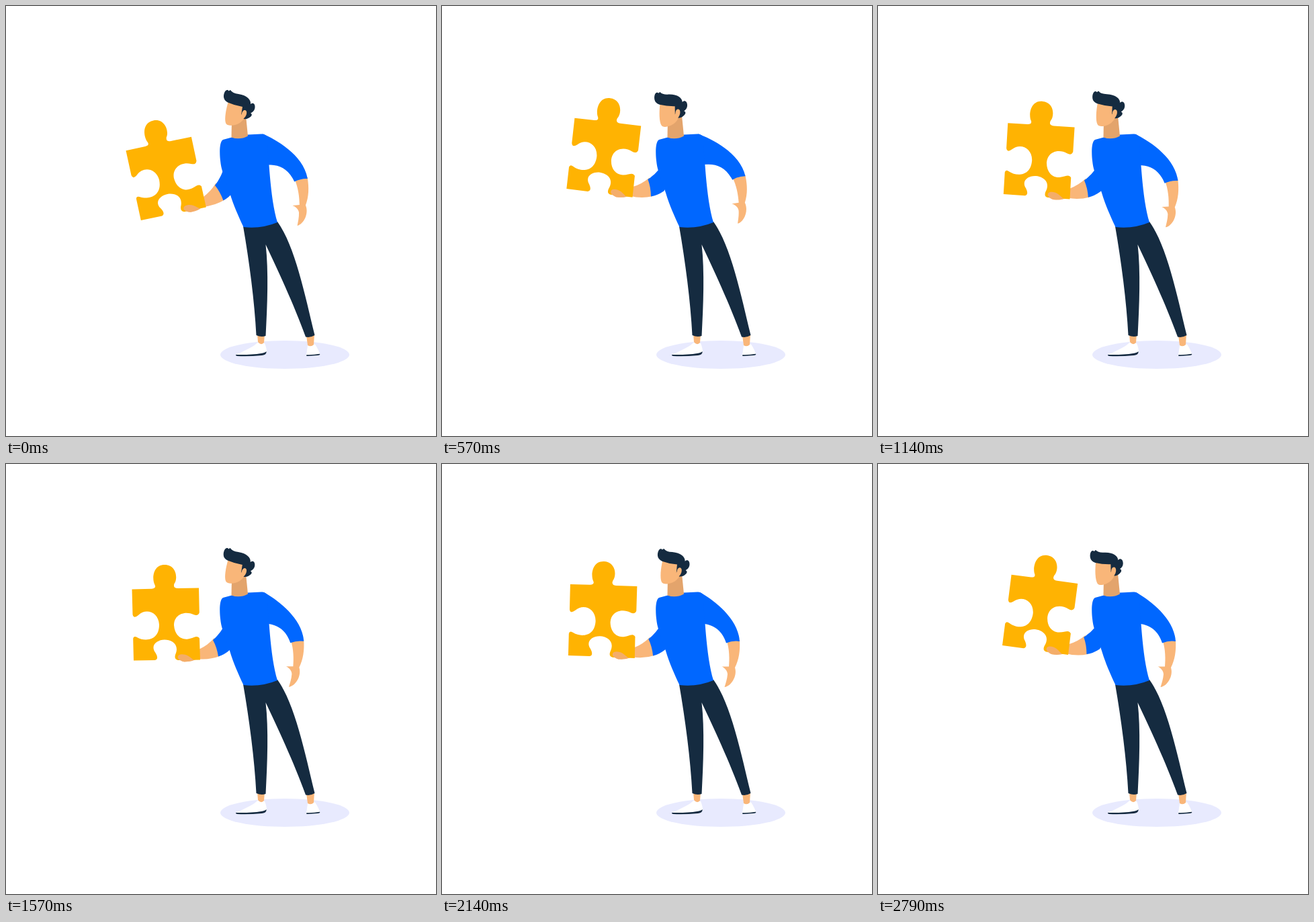
Write an HTML page that moves like this. It is 640 px wide and 640 px high and loops after 3710 ms.

```html
<!DOCTYPE html>
<html lang="en">
<head>
<meta charset="utf-8">
<style>
  html, body { margin: 0; width: 100%; height: 100%; overflow: hidden; background: #fff; }
  svg { display: block; width: 100%; height: 100%; }
  .skin { fill: #f9b679; }
  .navy { fill: #152b40; }
  .blue { fill: #0067ff; }
</style>
</head>
<body>
<svg viewBox="0 0 640 640">
  <ellipse cx="415" cy="519" rx="96" ry="21" fill="#e8eafe"/>

  <!-- feet and trousers -->
  <path fill="#fff" d="M342 519.5L362 509.5Q371 505 374 501L385 502Q388 509 388 515Q370 520 342 519.5ZM447 519.5L449 505L460 503.5Q465 511 467.5 518.5Z"/>
  <path class="skin" d="M374 488L375 500Q379 506 384 501L385 488ZM447 490L449 505Q454 508 458 504L459 488Z"/>
  <path class="navy" d="M342 519Q365 519.5 380 517Q386 516 387.5 514Q388.5 519 381 520Q360 522 344 521Q341.5 520.5 342 519ZM447.5 519.2Q458 519.5 467 517.8Q469 520 460 520.3L449 521Q446 521 447.5 519.2Z"/>
  <path class="navy" d="M353 328C362 380 370 440 372.5 490Q380 493.500 386.5 491C389 445 391 395 386.5 355C403 390 429 445 446 492.5Q453 494 459.5 490C445 430 430 357 404 321Z"/>

  <!-- free arm -->
  <g id="freeArm">
    <path class="skin" d="M423.500 262C428 276 428 290 427 301.500L416.500 301.500C421 303.500 425 308 425 313C424.500 320 422 327 420.500 332C430 331 440 316 436 303C442 291 444 278 443 262Z"/>
    <path class="blue" d="M384 191C401 200.500 441 228 443 264Q433 262.500 423 266.500C417 248 405 240 391 238L376 236L372 195Z"/>
  </g>

  <!-- arm with the puzzle piece -->
  <g id="heldArm">
    <path class="skin" d="M310 259Q300 270 288 275.500L262 288Q258 293 265 294.500Q278 293 285 290Q302 292 318 286Z"/>
    <path fill="#ffb302" d="M187.500 186.500L217 185.800Q224 185 221.500 180C217 172 218 150 236 150C254 150 256 171 250.500 178Q248 185 256 185L287 184.500L287.800 221Q286 227 279 224C266 218 250 224 250 240C251 256 262 262 271 260.500C280 259 284 254 288 259.500L289 291.500L256 292Q250 291 252 284C259 268 246 261.500 236 261.500C225 261.500 214 270 222.500 281Q228 290 222 292L190 292.500L189.200 260Q190 255 196 258.500C206 264 228 264 228 239C227 220 208 214 197 225Q190 231 188.500 224Z"/>
    <path fill="#f4ad69" d="M256 289C254 282 265 282 271 285.500C275 288 277 290 280 292C272 295 260 296 256 289Z"/>
    <path class="blue" d="M330 230L323 244Q317 254 308 262Q314 273 316 286.500Q325 284 334 276L345 250Z"/>
  </g>

  <path class="blue" d="M323 199C317 202 318 222 319 230Q320 240 322.500 247L333 278C338 295 346 313 353.500 329Q380 332 404 322C397 300 393.500 265 391.500 237L388 194Q385 190 380 190.500L360 191.500L336 195.500Z"/>
  <path fill="#e3a46c" d="M336 168L357 163L360 193.500Q348 200 335.500 195.500Z"/>

  <g id="head">
    <path class="skin" d="M331 142C327 155 325 168 327 174C329 180 342 178 348 174C353 170 356 167 357 160L354 147Z"/>
    <path class="navy" d="M324 135C324 127 329 122.500 331.500 126.500L334 125Q337 130 346 131C359 133 365 140 364 146C368 143 371 146 370.500 151C370 156 367 158 364 159.500Q367 161 365 164Q360 169 353.500 168L355 156L350 162L352 150Q340 148 330 143.500Q324 140 324 135Z"/>
    <path class="skin" d="M350.500 163C351 155 356 153 358 157C359 161 356 166 353 168Z"/>
  </g>
</svg>
<script>
const LOOP = 3710, STEP = 1000 / 14, LAST_STEP = 39;
const part = id => document.getElementById(id);
const head = part('head'), heldArm = part('heldArm'), freeArm = part('freeArm');

const progress = (t, from, to) => Math.min(1, Math.max(0, (t - from) / (to - from)));
const easeOut = (u, power) => 1 - (1 - u) ** power;
const easeInOut = u => (1 - Math.cos(Math.PI * u)) / 2;
const turn = (el, angle, x, y) => el.setAttribute('transform', `rotate(${angle} ${x} ${y})`);

// 1 = leaning left, 0 = leaning right
const sway = t => t < 1690
  ? 1 - easeInOut(progress(t, 690, 1690))
  : easeInOut(progress(t, 1690, 2790));

function draw(t) {
  const lean = t < 690 ? easeOut(progress(t, 0, 650), 1.4) : sway(t);
  const lift = t < 690 ? -12 + 19.5 * easeOut(progress(t, 0, 675), 1.7) : -1.5 + 9 * sway(t);
  const swing = t < 300
    ? 6 + 4 * easeOut(progress(t, 0, 300), 2)
    : 10 * (1 - easeInOut(progress(t, 300, 1700)));
  turn(head, -11 * lean, 345, 179);
  turn(heldArm, lift + 1.2, 335.5, 248.5);
  turn(freeArm, -swing, 379, 205);
}

function tick() {
  const step = Math.floor((performance.now() % LOOP + 5) / STEP);
  draw(Math.min(step, LAST_STEP) * STEP);
  requestAnimationFrame(tick);
}
tick();
</script>
</body>
</html>
```
